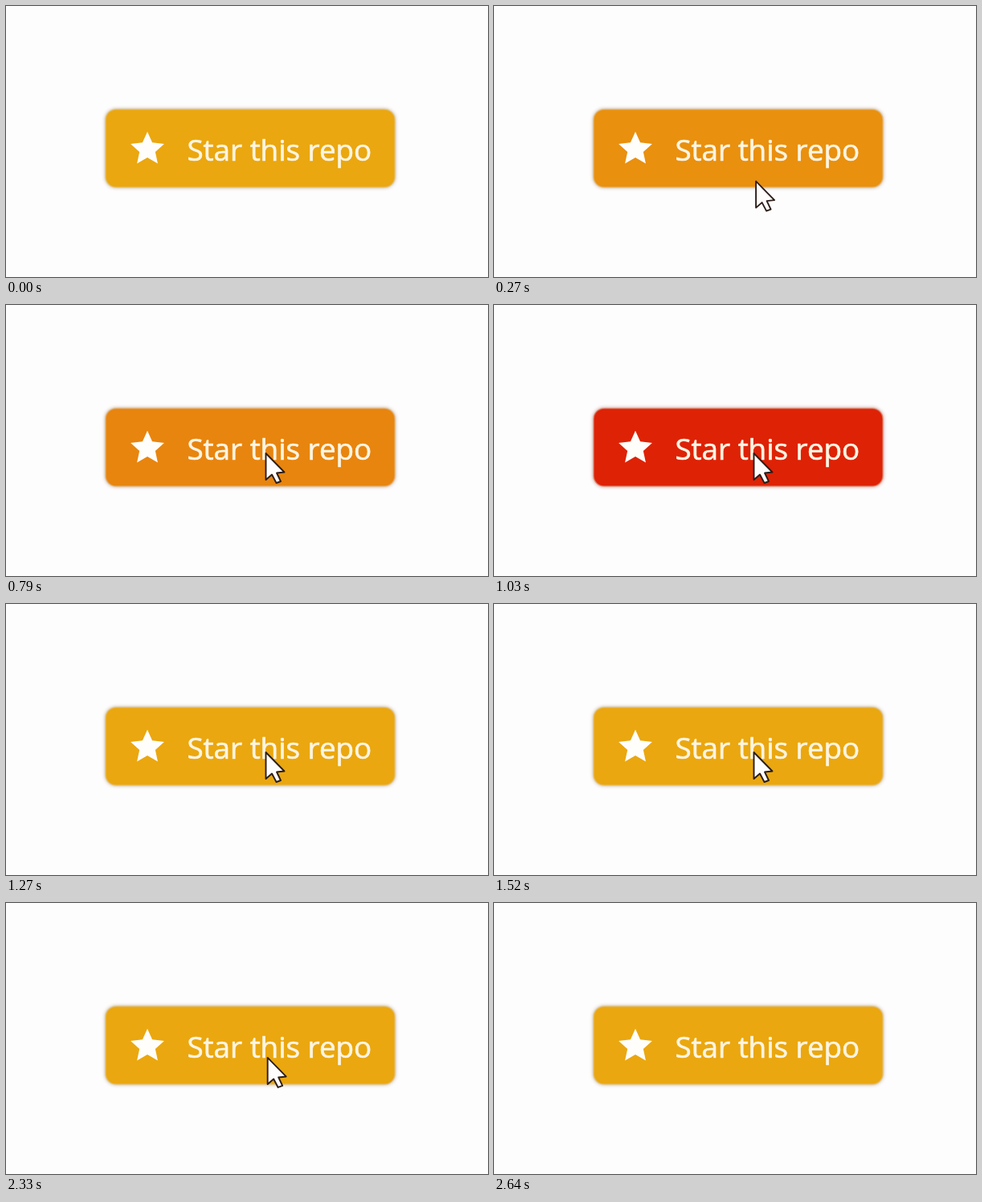
Recreate the animation shown at these times as an HTML page with a canvas. Size 600 by 338 pixels, loop 2.67 s.

```html
<!DOCTYPE html>
<html lang="en">
<head>
<meta charset="utf-8">
<title>Star button</title>
<style>
  html, body { margin: 0; width: 100%; height: 100%; overflow: hidden; background: #fefdfe; }
  canvas { display: block; }
</style>
</head>
<body>
<canvas id="stage" width="600" height="338"></canvas>
<script>
const ctx = document.getElementById('stage').getContext('2d');
const LOOP = 2670;
const AMBER = [234, 167, 15], ORANGE = [232, 133, 14], RED = [222, 34, 6], GREY = [120, 112, 100];

const clamp = v => Math.max(0, Math.min(1, v));
const progress = (t, from, to) => clamp((t - from) / (to - from));
const easeOut = p => 1 - (1 - p) ** 2;
const easeIn = p => p * p;
const mix = (a, b, p) => a.map((v, i) => v + (b[i] - v) * p);
const css = (c, alpha = 1) => `rgba(${c.map(Math.round).join(',')},${alpha})`;

function cursorAt(t) {
  if (t < 420) return mix([346, 342], [321, 187], easeOut(progress(t, 90, 420)));
  if (t < 2250) return mix([321, 187], [323.5, 185], progress(t, 470, 640));
  return mix([323.5, 185], [366, 342], easeIn(progress(t, 2250, 2610)));
}

function buttonColor(t) {
  let color = mix(AMBER, ORANGE, progress(t, 210, 300));
  color = mix(color, RED, progress(t, 860, 950));
  return mix(color, AMBER, progress(t, 1110, 1200));
}

function drawButton(color) {
  ctx.save();
  ctx.shadowColor = css(mix(GREY, color, 0.3), 0.85);
  ctx.shadowBlur = 5;
  ctx.fillStyle = css(color);
  ctx.beginPath();
  ctx.roundRect(124, 129, 360, 97, 13);
  ctx.fill();
  ctx.restore();
  ctx.strokeStyle = css(mix(color, [225, 215, 195], 0.55), 0.7);
  ctx.lineWidth = 1.5;
  ctx.stroke();
}

function drawStar(cx, cy, radius) {
  ctx.beginPath();
  for (let i = 0; i < 10; i++) {
    const r = i % 2 ? radius * 0.47 : radius;
    const angle = i * Math.PI / 5 - Math.PI / 2;
    ctx.lineTo(cx + r * Math.cos(angle), cy + r * Math.sin(angle));
  }
  ctx.closePath();
  ctx.fillStyle = '#fffefa';
  ctx.fill();
}

function drawLabel() {
  ctx.font = '400 36.8px "Open Sans", "Noto Sans", sans-serif';
  ctx.fillStyle = ctx.strokeStyle = '#fdf5e3';
  ctx.lineWidth = 0.7;
  ctx.lineJoin = 'round';
  ctx.fillText('Star this repo', 225.4, 193);
  ctx.strokeText('Star this repo', 225.4, 193);
}

function drawCursor([x, y]) {
  const outline = [[0, 0], [0, 33], [7.5, 26.5], [13, 37], [18.5, 35], [13.5, 24.5], [23, 23.5]];
  ctx.beginPath();
  for (const [dx, dy] of outline) ctx.lineTo(x + dx, y + dy);
  ctx.closePath();
  ctx.fillStyle = '#fffdfc';
  ctx.fill();
  ctx.strokeStyle = '#2b1d18';
  ctx.lineWidth = 1.9;
  ctx.lineJoin = 'round';
  ctx.stroke();
}

function draw(now) {
  const t = now % LOOP;
  ctx.fillStyle = '#fefdfe';
  ctx.fillRect(0, 0, 600, 338);
  drawButton(buttonColor(t));
  drawStar(176, 178.7, 22);
  drawLabel();
  if (t > 90 && t < 2610) drawCursor(cursorAt(t));
}

const start = performance.now();
function tick() {
  draw(performance.now() - start);
  requestAnimationFrame(tick);
}
tick();
</script>
</body>
</html>
```
